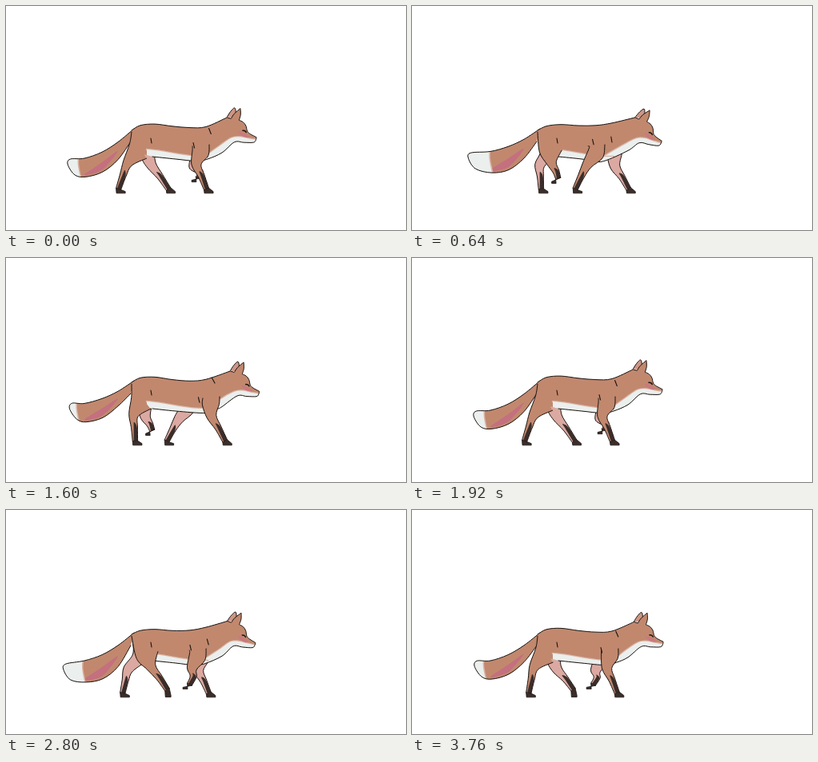
An HTML page with a canvas that plays this animation: 500x281 px, repeating every 3.84 s.

```html
<!DOCTYPE html>
<html lang="en">
<head>
<meta charset="utf-8">
<title>Walking fox</title>
<style>
html, body { margin: 0; width: 100%; height: 100%; overflow: hidden; background: #fff; }
canvas { display: block; width: 500px; height: 281px; }
</style>
</head>
<body>
<canvas id="stage" width="500" height="281"></canvas>
<script>
const ctx = document.getElementById('stage').getContext('2d');
const STEP = 80, CYCLE = 24, GROUND = 234;
const FUR = '#c1886e', FAR = '#dba9a1', WHITE = '#ebefed', PINK = '#c4707f';
const BLEND = '#d9b5a6', DARK = '#3b2d2a', INK = '#17120f';

// Cosine that peaks at the given phase, n times per cycle.
const wave = (p, peak, n = 1) => Math.cos(n * 2 * Math.PI * (p - peak) / CYCLE);
const mix = (a, b, k) => [a[0] + (b[0] - a[0]) * k, a[1] + (b[1] - a[1]) * k];
const smooth = u => u * u * (3 - 2 * u);
const quick = u => u + 0.3 * u * (1 - u);

// Adds a smooth curve through the points to a path.
function spline(path, pts, join) {
  path[join ? 'lineTo' : 'moveTo'](...pts[0]);
  for (let i = 0; i < pts.length - 1; i++) {
    const p = pts[i], q = pts[i + 1];
    const o = pts[i - 1] || p, r = pts[i + 2] || q;
    path.bezierCurveTo(p[0] + (q[0] - o[0]) / 6, p[1] + (q[1] - o[1]) / 6,
      q[0] - (r[0] - p[0]) / 6, q[1] - (r[1] - p[1]) / 6, q[0], q[1]);
  }
  return path;
}

const curve = pts => spline(new Path2D(), pts);

function fill(path, color) {
  ctx.fillStyle = color;
  ctx.fill(path);
}

function ink(path, width = 1, color = INK) {
  ctx.lineWidth = width;
  ctx.strokeStyle = color;
  ctx.stroke(path);
}

function clipped(path, draw) {
  ctx.save();
  ctx.clip(path);
  draw();
  ctx.restore();
}

// Both edges of a limb around its joints.
function edges(joints, widths) {
  const back = [], front = [];
  joints.forEach((p, i) => {
    const a = joints[i - 1] || p, b = joints[i + 1] || p;
    const dx = b[0] - a[0], dy = b[1] - a[1], s = widths[i] / (Math.hypot(dx, dy) || 1);
    back.push([p[0] - dy * s, p[1] + dx * s]);
    front.push([p[0] + dy * s, p[1] - dx * s]);
  });
  return [back, front];
}

const limb = (back, front) => spline(curve(back), front.slice().reverse(), true);

// Each leg stands for `stance` steps from `land`, sliding back at `speed`, then swings forward.
const HIND = {
  land: 12, stance: 13, reach: 203, speed: 5.2, lift: 14, bend: [1.5, 2], ease: smooth,
  hip: p => [171 + 6 * wave(p, 12.5), 182],
  knee: p => [167 + 15 * wave(p, 12), 197],
  tops: () => [[[157, 158]], []]
};
const FORE = {
  land: 16.5, stance: 16.5, reach: 294, speed: 5.8, lift: 16, bend: [5, 1], ease: quick,
  hip: p => [243 + 15 * wave(p, 18), 184],
  knee: p => [238 + 22 * wave(p, 18), 199],
  tops: ([x, y]) => [[[x - 10, y - 8]], [[x + 11, y - 10]]]
};

function leg(kind, p, far) {
  const q = (p + 2 * CYCLE - kind.land) % CYCLE;
  const u = Math.max(0, (q - kind.stance) / (CYCLE - kind.stance));
  const stride = kind.speed * kind.stance;
  const x = u ? kind.reach - stride * (1 - kind.ease(u)) : kind.reach - kind.speed * q;
  const up = Math.sin(Math.PI * u ** 1.1);
  const flex = Math.min(1, 1.2 * Math.sin(Math.PI * u ** 0.8));

  const hip = kind.hip(p), knee = kind.knee(p), ankle = [x, 229.5 - kind.lift * up];
  if (far) {
    hip[1] += 4;
    knee[1] += 3;
    for (const joint of [hip, knee, ankle]) joint[0] -= kind === FORE ? 3 : 0;
  }
  const mid = mix(knee, ankle, 0.5);
  const hock = [mid[0] + kind.bend[0] * up, mid[1] - 1 + kind.bend[1] * up];
  const turn = (26 + 125 * flex) * Math.PI / 180;
  const toe = [ankle[0] + 9.5 * Math.cos(turn), Math.min(GROUND, ankle[1] + 9.5 * Math.sin(turn))];

  const thigh = far ? 9 : kind === HIND ? 14 : 10.5;
  const [back, front] = edges([hip, knee, hock, ankle], [thigh, 6, 4, 3.2]);
  const [backTop, frontTop] = kind.tops(hip);
  const heel = [back[3][0] + 0.5, toe[1] + 1.2];
  const paw = new Path2D();
  [back[3], heel, [toe[0], toe[1] + 1.2], [toe[0], toe[1] - 1], front[3]].forEach(pt => paw.lineTo(...pt));
  paw.closePath();
  const sock = [mix(knee, hock, 0.6), mix(hock, front[2], 0.3), mix(ankle, front[3], 0.2)];

  back.unshift(...backTop);
  front.unshift(...frontTop);
  fill(limb(back, front), far ? FAR : FUR);
  fill(limb(...edges(sock, [0.5, 2, 2.4])), DARK);
  ink(curve(back));
  ink(curve(front));
  fill(paw, DARK);
  ink(paw, 0.8);
}

function tail(p) {
  const bend = wave(p, 1.2, 2), sway = wave(p, 10);
  const x = 75 - 4.5 * wave(p, 8);
  const y = 196.5 + 6.5 * wave(p, 1.5, 2) + 2 * wave(p, 12);
  const up = [[140, 169 + 2 * bend], [120, 180 + 4 * bend], [98, 187 + 5 * bend]];
  const tip = [[x + 3, y - 7], [x, y], [x + 9, y + 13]];
  const low = [[100, 212 + 5 * bend + 2 * sway], [121, 207 + 4.5 * bend + 3 * sway], [140, 192 + 4 * bend + 3 * sway]];
  const path = curve([[160, 154], ...up, ...tip, ...low, [156, 170]]);
  fill(path, FUR);
  clipped(path, () => {
    const across = (i, k) => mix(up[i], low[2 - i], k);
    fill(curve([across(2, 0.8), across(1, 0.5), across(0, 0.5), across(1, 0.87), across(2, 0.92), across(2, 0.8)]), PINK);
    const edge = x + 18 + 9 * wave(p, 8);
    const white = curve([[edge, y - 18], [edge - 1, y], [edge + 4, y + 24]]);
    ink(white, 3, BLEND);
    white.lineTo(50, y + 24);
    white.lineTo(50, y - 18);
    fill(white, WHITE);
  });
  ink(path);
}

function body(p) {
  const nod = wave(p, 7.5, 2), push = wave(p, 18);
  const hx = 2 + 2.5 * nod, hy = 1.2 + 1.4 * nod;
  const tilt = (2 + 3.5 * wave(p, 7) + 2 * nod) * Math.PI / 180;
  const c = Math.cos(tilt), s = Math.sin(tilt);
  const head = pts => pts.map(([x, y]) => {
    const dx = x - 293, dy = y - 128;
    return [293 + hx + dx * c - dy * s, 128 + hy + dx * s + dy * c];
  });

  const farEar = curve(head([[276, 139], [280.5, 132], [285.5, 127.5], [287, 133], [286, 140]]));
  fill(farEar, '#cd9686');
  ink(farEar);

  const spine = [[168, 150.5], [186, 149], [208, 151.3], [230, 152], [250, 149.5]]
    .map(([x, y], i) => [x, y + (0.8 + 0.5 * i) * wave(p, 13 + 2 * i)]);
  const ear = head([[281, 141], [285, 135], [292.7, 128.3]]);
  const brow = head([[292.7, 128.3], [293, 136], [291, 143]]);
  const face = head([[291, 143], [296, 145.5], [299.5, 150], [301.3, 157], [305, 160.5], [312.5, 164.5]]);
  const jaw = head([[312.5, 164.5], [312, 167.5], [309, 171], [297, 171], [285, 170.5]]);
  const chest = 184 + 3 * push, bx = 252 + 14 * push, by = 192 - 3 * push;
  const under = [[270, chest], [bx, by], [bx - 14, 194.5], [212, 192], [183, 189]];

  const path = curve([[157, 156], ...spine, ...head([[276, 139.5]])]);
  for (const part of [ear, brow, face, [...jaw, ...under]]) spline(path, part, true);
  const shape = spline(new Path2D(path), [[172, 186], [160, 170], [157, 156]], true);
  fill(shape, FUR);

  clipped(shape, () => {
    const bib = curve([...head([[314, 168], [302, 166], [291, 164], [281, 165.5]]),
      [268, chest - 9], [bx + 2, by - 7], [bx - 6, by]]);
    ink(bib, 2.5, BLEND);
    bib.lineTo(bx, 205);
    bib.lineTo(325, 205);
    fill(bib, WHITE);
    const belly = curve([[176, 180], [190, 181.5], [210, 185], [234, 188.5], [252, 189]]);
    ink(belly, 2.5, BLEND);
    belly.lineTo(bx - 2, 200);
    belly.lineTo(176, 200);
    fill(belly, WHITE);
    fill(curve(head([[289, 157], [296, 159], [304, 164.5], [296, 163.5], [289, 157]])), '#cb7880');
  });
  ink(path);
  ink(curve(head([[295.5, 156], [298, 156.3], [299.8, 158.2]])), 1.5);
}

function marks(p) {
  const push = wave(p, 18.5);
  const tick = (x, y, dx, dy) => ink(curve([[x, y], [x + dx, y + dy]]), 1.1);
  tick(181, 166, 1, 6);
  tick(233 + 8 * push, 171 + 4 * push, 1.5, 6.5);
  tick(253 + 4.5 * push, 157 + 7 * wave(p, 8), 2.5 + 1.5 * push, 7);
}

function draw(p) {
  ctx.fillStyle = '#fff';
  ctx.fillRect(0, 0, 500, 281);
  ctx.lineCap = ctx.lineJoin = 'round';
  leg(HIND, p + CYCLE / 2, true);
  leg(FORE, p + CYCLE / 2, true);
  tail(p);
  body(p);
  leg(HIND, p, false);
  leg(FORE, p, false);
  marks(p);
}

const start = performance.now();
function tick() {
  draw(Math.floor((performance.now() - start) / STEP) % CYCLE);
  requestAnimationFrame(tick);
}
tick();
</script>
</body>
</html>
```
